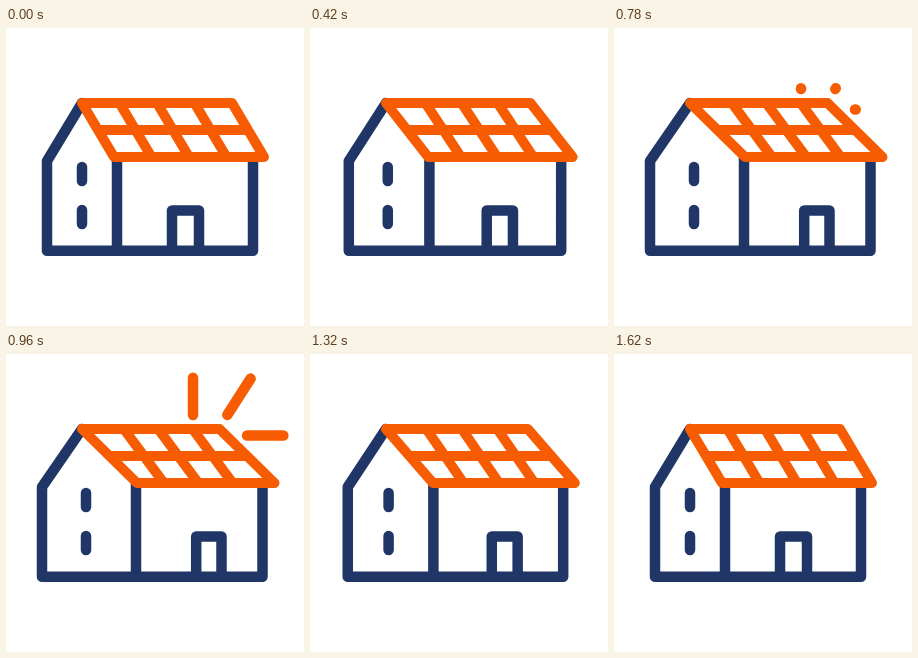
An HTML page that plays this animation: 298 by 298 pixels, repeating every 1.74 s.

```html
<!DOCTYPE html>
<html lang="en">
<head>
<meta charset="utf-8">
<title>Solar house</title>
<style>
  html, body { margin: 0; height: 100%; overflow: hidden; background: #fff; }
  svg { display: block; width: 100vw; height: 100vh; }
  path { fill: none; stroke-width: 10.5; stroke-linecap: round; stroke-linejoin: round; }
  #house { stroke: #203666; }
  #roof, #rays { stroke: #f75c02; }
  #roof { stroke-width: 10; }
</style>
</head>
<body>
<svg viewBox="0 0 298 298">
  <path id="house"/>
  <path id="roof"/>
  <path id="rays"/>
</svg>
<script>
const LOOP = 1740, STEP = 30;
const [house, roof, rays] = ['house', 'roof', 'rays'].map(id => document.getElementById(id));

// Each ray: inner x, y, outer x, y
const RAYS = [[187, 61, 187, 16], [221.3, 61, 249.5, 17], [241, 81.5, 285, 81.5]];

const mix = (a, b, p) => a + (b - a) * p;

// Cubic ease-in-out progress between two times
function ease(t, from, to) {
  const x = Math.min(1, Math.max(0, (t - from) / (to - from)));
  return x < .5 ? 4 * x ** 3 : 1 - 4 * (1 - x) ** 3;
}

function drawHouse(p) {
  const left = mix(41, 36, p), right = mix(247, 256.5, p), corner = mix(111, 130, p);
  const win = mix(76, 80, p), door = mix(166, 190.2, p), doorEnd = mix(193, 215.5, p);
  house.setAttribute('d',
    `M76 75L${left} 133V222.7H${right}V130M${corner} 130V222.7` +
    `M${win} 139V153M${win} 182V196` +
    `M${door} 222.7V182.5H${doorEnd}V222.7`);
}

function drawRoof(p) {
  const width = mix(150, 137.5, p), slant = mix(32, 55, p);
  // Panel dividers tilt less than the roof edges, pivoting on the middle rail
  const tilt = mix(32, 40, p);
  let d = `M76 75h${width}l${slant} 54h${-width}zM${76 + slant / 2} 102h${width}`;
  for (let i = 1; i < 4; i++) {
    const x = 76 + width * i / 4 + (slant - tilt) / 2;
    d += `M${x} 75l${tilt} 54`;
  }
  roof.setAttribute('d', d);
}

function drawRays(t) {
  const head = ease(t, 720, 1090), tail = ease(t, 934, 1304);
  rays.setAttribute('d', head > tail ? RAYS.map(([x1, y1, x2, y2]) =>
    `M${mix(x1, x2, tail)} ${mix(y1, y2, tail)}L${mix(x1, x2, head)} ${mix(y1, y2, head)}`
  ).join('') : '');
}

function frame() {
  const t = Math.floor(performance.now() % LOOP / STEP) * STEP;
  const turn = ease(t, 132, 732) - ease(t, 1054, 1654);
  drawHouse(turn);
  drawRoof(turn);
  drawRays(t);
  requestAnimationFrame(frame);
}
frame();
</script>
</body>
</html>
```
